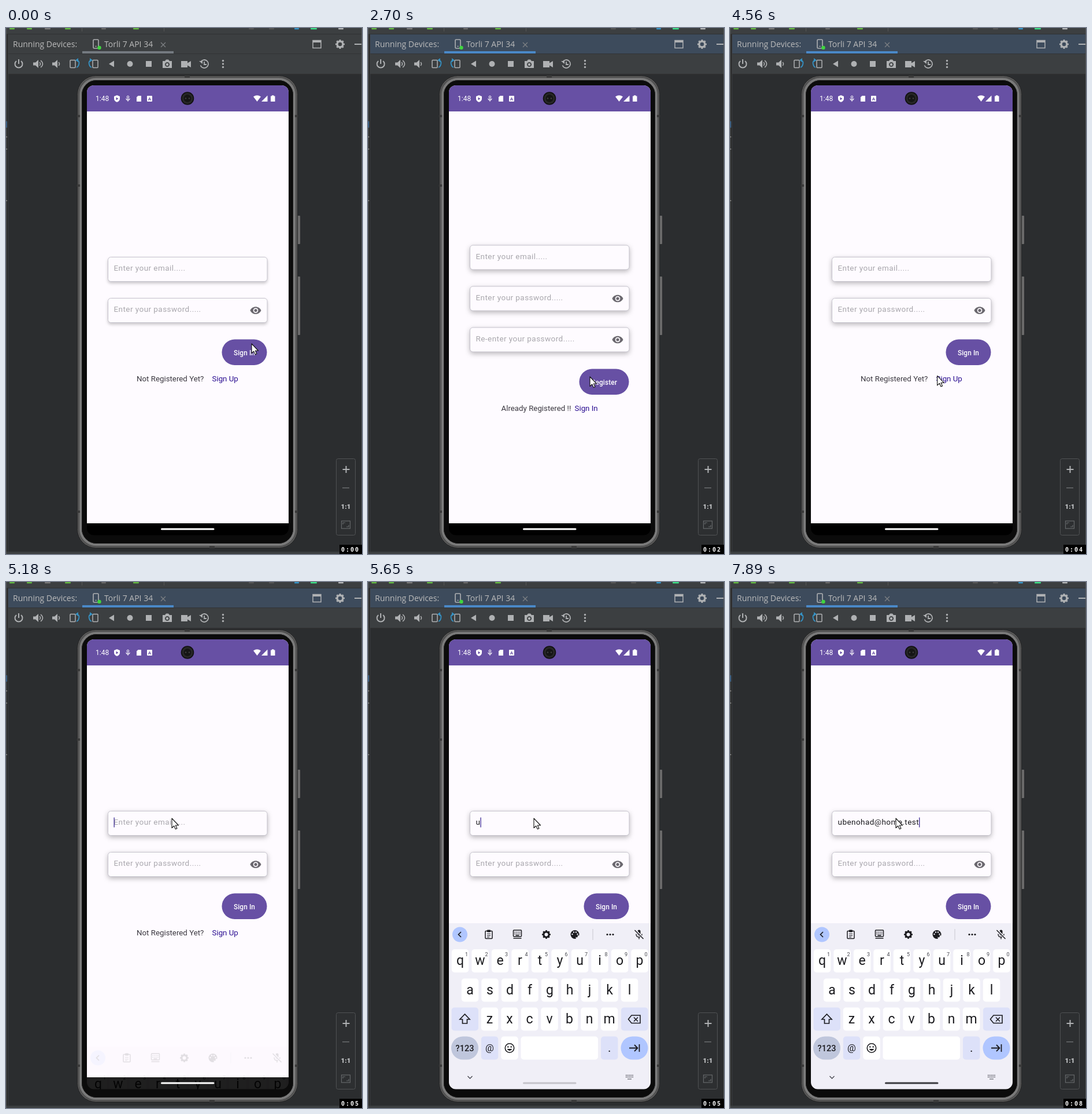
Animation of 616 by 908 pixels, one loop 8 s. Source, as an HTML page:

```html
<!DOCTYPE html>
<html lang="en">
<head>
<meta charset="utf-8">
<title>Sign-in form demo</title>
<style>
html, body { margin: 0; width: 100%; height: 100%; overflow: hidden; background: #2b2d2f; }
svg { display: block; width: 616px; height: 908px; }
text { font-family: Roboto, sans-serif; white-space: pre; }
.ide { font: 14px "Open Sans", sans-serif; }
.body { font-size: 13.3px; }
.input { font-size: 13.55px; letter-spacing: .42px; }
.btn { font-size: 11.86px; font-weight: 500; letter-spacing: .085px; }
.clock { font: bold 10px "DejaVu Sans Mono", monospace; letter-spacing: 2px; }
</style>
</head>
<body>
<script>
const LOOP = 8000;
const GREY = '#afb1b3', INK = '#1b1b1f', PURPLE = '#6750a4', PAGE = '#fefbff';
const USER = 'ubenohad', HOST = '@home.test';

// Markup helpers
const rect = (x, y, w, h, fill, rx = 0, more = '') =>
  `<rect x="${x}" y="${y}" width="${w}" height="${h}" rx="${rx}" fill="${fill}" ${more}/>`;
const disc = (x, y, r, fill, more = '') => `<circle cx="${x}" cy="${y}" r="${r}" fill="${fill}" ${more}/>`;
const fillPath = (d, fill, more = '') => `<path d="${d}" fill="${fill}" fill-rule="evenodd" ${more}/>`;
const line = (d, color, w = 1.5, more = '') =>
  `<path d="${d}" fill="none" stroke="${color}" stroke-width="${w}" ${more}/>`;
const text = (s, x, y, fill, cls = '', more = '') =>
  `<text x="${x}" y="${y}" fill="${fill}" class="${cls}" ${more}>${s}</text>`;
const mid = (s, x, y, fill, size, more = '') =>
  text(s, x, y, fill, '', `font-size="${size}" text-anchor="middle" ${more}`);
const at = (x, y, body) => `<g transform="translate(${x} ${y})">${body}</g>`;
const group = (id, body, more = '') => `<g id="${id}" ${more}>${body}</g>`;
const outline = (color, w = 1.5) => `stroke="${color}" stroke-width="${w}"`;

const gear = (x, y, r, color) => at(x, y,
  disc(0, 0, r * .62, 'none', outline(color, r * .42)) +
  disc(0, 0, r * .87, 'none', outline(color, r * .27) +
    ` pathLength="16" stroke-dasharray="1" stroke-dashoffset=".5"`));

function ide() {
  let s = rect(0, 0, 616, 908, '#2b2d2f') + rect(0, 0, 616, 80, '#3c3f41');
  // Cropped toolbar along the top edge
  [[6, 9, '#62b543'], [36, 9, '#62b543'], [67, 10, '#777'], [102, 10, '#62b543'], [165, 8, '#666'],
   [220, 10, '#62b543'], [420, 9, '#555'], [455, 9, '#555'], [499, 8, '#3592c4'], [527, 11, '#3ddc84'],
   [575, 9, GREY]].forEach(([x, w, c]) => s += rect(x, 0, w, 2.5, c, 1));
  s += rect(131, 0, 1, 6, '#555') + rect(273, 0, 1, 6, '#555') + rect(0, 10, 616, 1.2, '#2f3133');
  s += `<rect id="head" x="4" y="11" width="611" height="33"/><rect id="tab" x="132" y="40" width="158" height="4"/>`;
  s += rect(4, 44, 612, 1, '#323436') + rect(0, 79, 616, 1, '#323232') +
    rect(0, 11, 3, 897, '#2b2b2b') + rect(3, 11, 1, 897, '#3a3c3e') + rect(0, 904, 616, 4, '#3c3f41');
  s += rect(0, 0, 1, 908, '#515456') + rect(615, 0, 1, 908, '#515456');
  [[161, 11, '#3d6185'], [187, 2, '#777'], [208, 2, '#777'], [297, 2, '#777']]
    .forEach(([y, h, c]) => s += rect(0, y, 2, h, c));

  s += text('Running Devices:', 12, 33, '#bbb', 'ide') + text('Torli 7 API 34', 170, 33, '#bbb', 'ide');
  s += rect(151, 20, 9, 15, 'none', 1.5, outline(GREY, 1.6)) + rect(154, 31, 3, 1, GREY) + disc(161.5, 34, 3.2, '#3fd63f');
  s += line('M268 25l8 8m0-8l-8 8', '#7f8285', 1.2);
  s += rect(531, 21.5, 14, 13, 'none', 0, outline(GREY)) + rect(531, 21, 14, 4, GREY);
  s += gear(578, 28, 8, GREY) + rect(603, 27, 12, 2, GREY);

  const speaker = 'M-8-2.5h4l5-4.5v14l-5-4.5h-4z';
  const turn = (x, dir) => `<g transform="translate(${x} 62) scale(${dir} 1)">` +
    rect(-8, -6.5, 9, 13, 'none', 1, outline(GREY)) + line('M3-6.5q6 1 4 7.500q-1 4-4 5', '#3592c4', 1.8) +
    fillPath('M1-6.5l5-3.500v7z', '#3592c4') + '</g>';
  s += at(22, 62, line('M-4-5a6.500 6.500 0 1 0 8 0M0-8v8', GREY, 2));
  s += at(55, 62, fillPath(speaker, GREY) + line('M3-3q3 3 0 6M5-6q7 6 0 12', GREY));
  s += at(88, 62, fillPath(speaker, GREY) + line('M3-3q3 3 0 6', GREY));
  s += turn(119, 1) + turn(151, -1);
  s += fillPath('M178 62l9-5.500v11z', GREY) + disc(214.5, 62, 5, GREY) + rect(242, 57, 10, 10, GREY);
  s += at(279, 62, fillPath('M-8-5h4l2-2.500h4l2 2.500h4v12h-16zM0-3a4 4 0 1 0 .1 0z', GREY) + disc(0, 1, 2.2, GREY));
  s += fillPath('M303 57h11v3.500l6-3.500v11l-6-3.500v3.500h-11z', GREY);
  s += at(343, 62, line('M-6-3.500a7 7 0 1 1-.5 6M0-4v5h4', GREY, 1.8) + fillPath('M-9-5h6v5z', GREY));
  [56.5, 62, 67.5].forEach(y => s += disc(375.5, y, 1.7, GREY));

  // Zoom panel
  s += rect(571.5, 743.5, 33, 132, '#2d2f31', 3, outline('#505254', 1));
  s += line('M582.500 762h12M588.500 756v12', GREY, 2) + rect(582, 793, 12, 1.6, '#65686a');
  s += mid('1:1', 588, 830, '#c4c6c8', 11.5, 'font-weight="900"');
  s += rect(580.5, 851, 15, 13, 'none', 0, outline('#65686a', 1.2)) +
    line('M583 857v-3h4M593 858v3h-4', '#65686a', 1.2);
  return s;
}

function phone() {
  let s = rect(503, 324, 6, 49, '#6b6b6b', 1) + rect(503, 429, 6, 101, '#6b6b6b', 1);
  s += rect(123.5, 82.5, 381, 815, '#5e5e5e', 32, outline('#242424', 1));
  s += rect(126, 85, 376, 810, '#707070', 30, outline('#4a4a4a', 1.5));
  s += rect(129.5, 88.5, 369, 803, '#0b0b0b', 27, outline('#7c7c7c', 3));
  s += rect(131.5, 90.5, 365, 799, '#0b0b0b', 25, outline('#1c1c1c', 1));
  [[123, 150], [123, 270], [123, 833], [500, 150], [500, 833]].forEach(([x, y]) => s += rect(x, y, 5, 4, '#3a3a3a'));
  return s + rect(309, 82, 9, 4, '#3a3a3a') + rect(352, 894, 9, 4, '#3a3a3a');
}

function statusBar() {
  let s = rect(140, 99, 349, 45, PURPLE) + text('1:48', 155, 126, '#fff', '', 'font-size="12"');
  s += fillPath('M192 116l5 2v4q0 4-5 6q-5-2-5-6v-4zM190.500 119.500v5l4-2.500z', '#fff');
  s += disc(211, 119, 1.8, 'none', outline('#fff', 1)) + line('M208 121.500q0 3 3 3t3-3M211 121v6', '#fff', 1.1);
  s += fillPath('M228.500 117h5.500v10h-8v-7.500z', '#fff');
  s += rect(244, 117, 9, 10, '#fff', 1) + mid('A', 248.5, 125, PURPLE, 8, 'font-weight="700"');
  s += fillPath('M428 118.500q6.500-4.500 13 0l-6.500 8.500z', '#fff') + fillPath('M442 127h10.500v-10.500z', '#fff') +
    fillPath('M458 117.500h2v-1.200h3.500v1.200h2v9.500h-7.500z', '#fff');
  return s + disc(314, 121.5, 11.3, '#111') + disc(314, 121.5, 9.5, '#272727') + disc(314, 121.5, 6.5, '#151515') +
    disc(311, 121.5, 1.3, '#3d3d3d') + disc(317, 121.5, 1.3, '#3d3d3d');
}

function field(y, hint, eye, id = '') {
  let s = `<rect class="card" x="176.5" y="${y}" width="275.5" height="42" rx="5" fill="${PAGE}" stroke="#c5c3cc"/>`;
  s += text(hint, 186.5, y + 23.5, '#a9a7ad', 'input', id && `id="${id}"`);
  if (eye) s += at(432, y + 21,
    fillPath('M-9.500 0C-6-8.400 6-8.400 9.500 0C6 8.400-6 8.400-9.500 0zM0-4.300a4.300 4.300 0 1 0 .1 0z', '#6b686f') +
    disc(0, 0, 2.6, '#6b686f'));
  return s;
}
const button = (x, y, label) => rect(x, y, 451.5 - x, 44.5, PURPLE, 22.2) +
  text(label, (x + 451.5) / 2, y + 27, '#fff', 'btn', 'text-anchor="middle"');

const signIn = () => field(395.5, 'Enter your email.....', false, 'hint') +
  field(466.5, 'Enter your password.....', true) + button(373.5, 537.5, 'Sign In') +
  text('Not Registered Yet?', 226, 610, '#3b3840', 'body') + text('Sign Up', 356.5, 610, '#2a0d91', 'body') +
  text('', 186.5, 419, INK, 'input', 'id="email"') +
  rect(187, 421.5, 0, 1, INK, 0, 'id="under"') + rect(187, 406.5, 1.4, 17, '#4b3a9c', 0, 'id="caret"');

const register = () => field(375, 'Enter your email.....') + field(446, 'Enter your password.....', true) +
  field(517, 'Re-enter your password.....', true) + button(365.5, 588.5, 'Register') +
  text('Already Registered !!', 230.5, 661, '#3b3840', 'body') + text('Sign In', 357.5, 661, '#2a0d91', 'body');

function keyboard() {
  const soft = '#dde1f9', blue = '#b0c6ff', step = 34.5;
  const key = (x, y, w, fill = '#fff', rx = 5) => rect(x, y, w, 40, fill, rx);
  let s = rect(140, 589, 349, 290, '#f0eff7') + disc(159, 608.5, 13, blue);

  s += group('tools', line('M161 604l-4.500 4.500 4.500 4.500', INK, 1.7) +
    at(209, 608.5, rect(-6, -6, 12, 13, 'none', 1, outline(INK)) + rect(-3, -8, 6, 4, INK, 1) +
      line('M-3-1h6M-3 2h6M-3 4.500h4', INK, 1.2)) +
    at(258.5, 608, rect(-7, -7, 14, 11, 'none', 1, outline(INK)) +
      line('M-5-3.500h10M-5-.5h10', INK, 1.5, 'stroke-dasharray="1.500 1.300"') + line('M-3 2h6M-7 7h14', INK, 1.4)) +
    gear(308.5, 608.5, 7.5, INK) +
    at(358, 608.5, disc(0, 0, 7.5, INK) + disc(5, 5, 3.5, '#f0eff7') + disc(3, 3, 2, INK) +
      [[-4.5, -.5], [-2, -4], [2, -4], [4.5, -.5]].map(([x, y]) => disc(x, y, 1.2, '#f0eff7')).join('')) +
    rect(388.5, 599, 1, 19, '#c8c7d0') + [414, 419, 424].map(x => disc(x, 608.5, 1.6, INK)).join(''));

  s += group('words', line('M157 604l4.500 4.500-4.500 4.500', INK, 1.7) +
    mid('', 225.5, 614, INK, 15.8, 'id="word"') + rect(275, 599, 1, 20, '#c8c7d0') + rect(374, 599, 1, 20, '#c8c7d0') +
    group('offer', mid(USER, 324.5, 605, INK, 13.4, 'font-weight="500"') + mid(HOST, 324.5, 619, INK, 11)));

  s += at(469, 608.5, rect(-2.5, -8, 5, 10, INK, 2.5) + line('M-5-1q0 5.500 5 5.500t5-5.500M0 4v4', INK, 1.4) +
    line('M-7-8l14 15', '#f0eff7', 4) + line('M-7.500-7.500l15 15', INK, 1.5));

  [['qwertyuiop', 159.5, 634], ['asdfghjkl', 176.5, 684.5], ['zxcvbnm', 210.5, 734.5]].forEach(([row, x0, y]) => {
    [...row].forEach((c, i) => {
      const x = x0 + i * step;
      s += key(x - 14.7, y, 29.5) + mid(c, x, y + 27, INK, 23);
      if (y === 634) s += mid((i + 1) % 10, x + 11, y + 11.5, '#45464f', 9);
    });
  });
  s += key(144.5, 734.5, 46.5, soft) + line('M167.500 746l-8.500 9h4.500v7h8v-7h4.500z', INK, 1.7);
  s += key(438, 734.5, 46.5, soft) + line('M456 748h15v13.500h-15l-5.500-6.700zM460 751.500l7 7m0-7l-7 7', INK, 1.6);
  s += key(144, 784.5, 47, '#bfc6dc', 20) + mid('?123', 167.5, 809.5, INK, 14.5, 'font-weight="500"');
  s += key(195.8, 784.5, 29.5, soft) + mid('@', 210.5, 810, INK, 16.5);
  s += key(230.3, 784.5, 29.5) + disc(245, 804.5, 7.7, 'none', outline(INK, 1.6)) +
    disc(242.3, 802.5, 1.2, INK) + disc(247.7, 802.5, 1.2, INK) + fillPath('M240.500 806h9q-4.500 6.500-9 0z', INK);
  s += key(264.5, 784.5, 133.5) + key(403, 784.5, 29.5, soft) + mid('.', 417.8, 811, INK, 21);
  s += key(437.5, 784.5, 47, blue, 20) + line('M452 804.500h14M461 799l5.500 5.500-5.500 5.500M469.500 798v13', INK, 1.8);
  s += line('M172.500 853l4 4 4-4', '#45464f', 1.3);
  [851.5, 854.5].forEach(y => s += line(`M446 ${y}h13`, '#45464f', 1.5, 'stroke-dasharray="1.600 1.200"'));
  return s + line('M449 858h7', '#45464f', 1.2);
}

document.body.innerHTML = `<svg viewBox="0 0 616 908" xmlns="http://www.w3.org/2000/svg">
<defs><clipPath id="glass">${rect(140, 99, 349, 776.5, '#000', 12)}</clipPath></defs>
${ide()}${phone()}
<g clip-path="url(#glass)">${rect(140, 99, 349, 756, PAGE)}${rect(140, 855, 349, 21, '#000')}${statusBar()}
${group('signIn', signIn())}${group('register', register())}${group('keys', keyboard())}
${rect(268, 863.5, 92.5, 3, '#fff', 1.5, 'id="handle"')}</g>
${disc(0, 0, 10, 'none', 'id="ripple" ' + outline('#26262e', 1.3))}
${group('mouse', fillPath('M0 0V16.500L3.800 13L6.300 18.600L8.900 17.500L6.400 12H11.500z', '#fff',
  'stroke="#111" stroke-width="1.1" stroke-linejoin="round"'))}
${rect(577, 892, 39, 16, '#000')}${text('', 580, 903.5, '#fff', 'clock', 'id="clock"')}
</svg>`;

const $ = id => document.getElementById(id);
const show = (id, on) => $(id).style.display = on ? '' : 'none';
const during = (t, a, b) => t >= a && t < b;

// Timeline tables, in ms
const TYPED = [5570, 5740, 5930, 6090, 6180, 6270, 6360, 6570,
  6710, 6880, 7000, 7120, 7240, 7390, 7540, 7690, 7760, 7830];
const TICKS = [1030, 1990, 2980, 3990, 4990, 5970, 6980, 7890];
const MOVES = [[1580, 1980, 425, 545, 384, 602], [3350, 3520, 384, 602, 378, 646],
  [3780, 3900, 378, 646, 379, 655], [4400, 4930, 379, 655, 287, 408]];
const RISE = [[5180, 213, .12], [5240, 105, .55], [5300, 40, .85], [5360, 9, 1], [5420, 0, 1]];
const CLICKS = [[2180, 2270], [3960, 4100], [4950, 5030]];

const count = (list, t) => list.filter(v => v <= t).length;

function mouseAt(t) {
  const m = MOVES.findLast(v => t >= v[0]);
  if (!m) return [425, 545];
  const [a, b, x0, y0, x1, y1] = m;
  const p = Math.min(1, (t - a) / (b - a)), e = p * p * (3 - 2 * p);
  return [x0 + (x1 - x0) * e, y0 + (y1 - y0) * e];
}

function draw(t) {
  const active = t >= 2270;
  $('head').setAttribute('fill', active ? '#3d4b5c' : '#3c3f41');
  $('tab').setAttribute('fill', active ? '#4a88c7' : '#747a80');

  const onRegister = during(t, 2700, 4380);
  show('register', onRegister);
  show('signIn', !onRegister);
  const shadow = t < 2700 ? 'drop-shadow(0 3px 2.5px #0003)' : 'drop-shadow(0 3px 4px #0004)';
  for (const c of cards) if (c.style.filter !== shadow) c.style.filter = shadow;

  const n = count(TYPED, t);
  $('email').textContent = (USER + HOST).slice(0, n);
  const width = n ? $('email').getComputedTextLength() : 0;
  show('hint', n === 0);
  show('caret', t >= 5180);
  $('caret').setAttribute('x', 186.5 + width);
  $('under').setAttribute('width', n > 1 && n <= USER.length ? width : 0);

  const rise = RISE.findLast(v => t >= v[0]);
  show('keys', rise);
  if (rise) {
    $('keys').setAttribute('transform', `translate(0 ${rise[1]})`);
    $('keys').setAttribute('opacity', rise[2]);
  }
  const suggesting = during(t, 5740, 6790);
  show('tools', !suggesting);
  show('words', suggesting);
  show('offer', t >= 6630);
  $('word').textContent = USER.slice(0, n);
  $('handle').setAttribute('fill', t < 5300 ? '#fff' : t < 5740 ? '#c4c3ca' : '#3a3a3f');

  const [x, y] = mouseAt(t);
  $('mouse').setAttribute('transform', `translate(${x} ${y})`);
  show('ripple', CLICKS.some(([a, b]) => during(t, a, b)));
  $('ripple').setAttribute('transform', `translate(${x + 1} ${y + 3})`);
  $('clock').textContent = '0:0' + count(TICKS, t);
}

const cards = document.querySelectorAll('.card');
const start = performance.now();
function tick(now) {
  draw(Math.max(0, now - start) % LOOP);
  requestAnimationFrame(tick);
}
draw(0);
requestAnimationFrame(tick);
</script>
</body>
</html>
```
